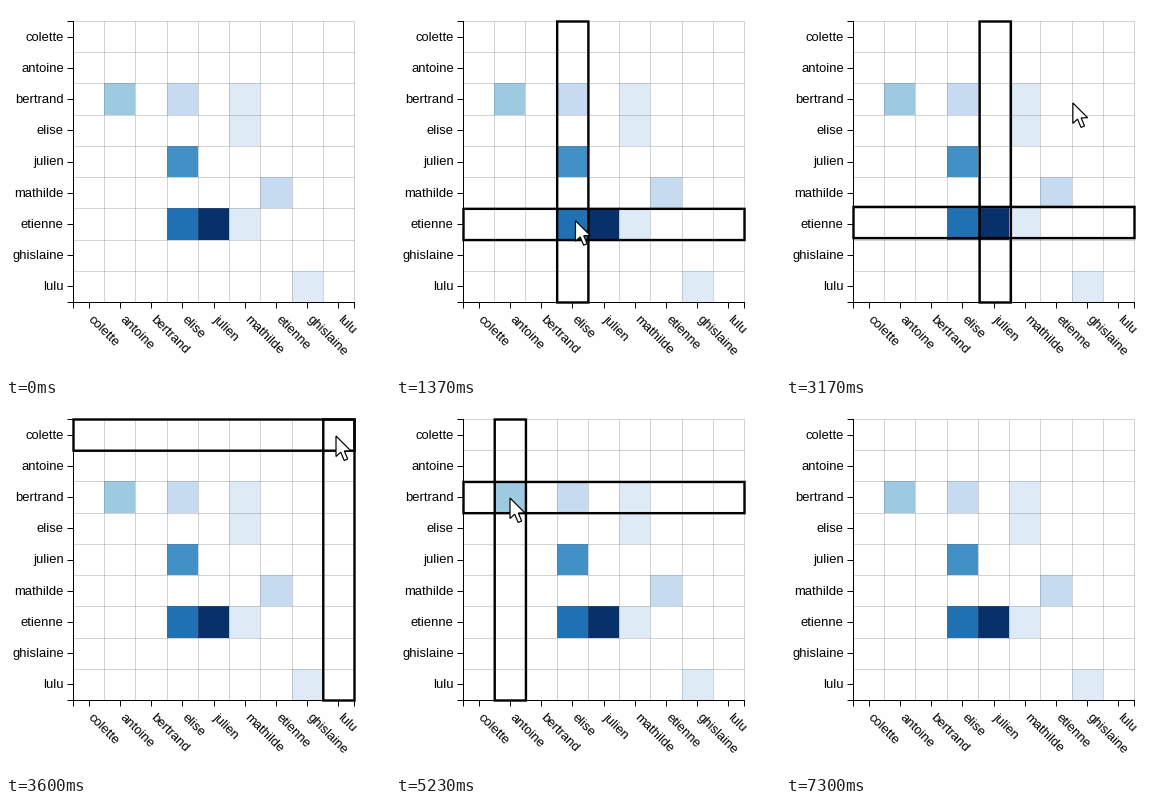
Write a matplotlib script that moves like this. It is 384x370 px and loops after 7.33 s.

```python
import matplotlib.pyplot as plt
from matplotlib.animation import FuncAnimation
from matplotlib.patches import Polygon, Rectangle

W, H = 384, 370
FRAMES, LOOP = 220, 7330
SUBSTEPS = 8  # hover checks per frame
PX = 0.72  # points per pixel at 100 dpi
LEFT, TOP, SIZE = 67, 15, 281
NAMES = ["colette", "antoine", "bertrand", "elise", "julien",
         "mathilde", "etienne", "ghislaine", "lulu"]
STEP = SIZE / len(NAMES)
RIGHT, BOTTOM = LEFT + SIZE, TOP + SIZE

# (column, row): number of links
LINKS = {(1, 2): 3, (3, 2): 2, (5, 2): 1, (5, 3): 1, (3, 4): 5,
         (6, 5): 2, (3, 6): 6, (4, 6): 8, (5, 6): 1, (7, 8): 1}

# pointer moves: start in seconds, x, y
ENTRY = (400, 28)
MOVES = [(0.3, 349, 14), (0.647, 192, 207), (1.1, 179, 215), (2.4, 207, 217),
         (2.985, 330, 32), (4.218, 114, 94), (6.1, 46, 94)]
MOVE, GLIDE = 0.3, 0.2
ARROW = [(0, 0), (0, 20.5), (4.7, 16.2), (8.2, 24.5), (11.7, 23),
         (8.3, 15), (14.8, 14.8)]


def progress(t, start, length):
    return min(max((t - start) / length, 0), 1)


def ease(u):
    return 4 * u ** 3 if u < 0.5 else 1 - 4 * (1 - u) ** 3


def mix(a, b, k):
    return tuple(p + (q - p) * k for p, q in zip(a, b))


def pointer_at(t):
    if not MOVES[0][0] <= t < MOVES[-1][0] + MOVE:
        return None
    tip = ENTRY
    for start, *stop in MOVES:
        u = progress(t, start, MOVE)
        tip = mix(tip, stop, u * u * (3 - 2 * u))
    return tip


def cell_at(tip):
    if tip is None:
        return None
    x, y = tip
    if LEFT <= x < RIGHT and TOP <= y < BOTTOM:
        return int((x - LEFT) / STEP), int((y - TOP) / STEP)


def track_hover():
    """Bands glide to the hovered cell; each new cell restarts the glide."""
    states = []
    cell, origin, spot, start = None, (0, 0), (0, 0), 0
    for n in range(FRAMES * SUBSTEPS):
        t = n * LOOP / 1000 / FRAMES / SUBSTEPS
        hovered = cell_at(pointer_at(t))
        if hovered != cell:
            cell, origin, start = hovered, spot, t
        if cell:
            spot = mix(origin, cell, ease(progress(t, start, GLIDE)))
        if n % SUBSTEPS == 0:
            states.append(spot if cell else None)
    return states


plt.rcParams["font.family"] = "Liberation Sans"
fig = plt.figure(figsize=(W / 100, H / 100), dpi=100, facecolor="#fefefe")
ax = fig.add_axes([0, 0, 1, 1])
ax.set_xlim(0, W)
ax.set_ylim(H, 0)
ax.axis("off")


def line(xs, ys, color="black", z=3):
    ax.plot(xs, ys, color=color, lw=PX, solid_capstyle="butt", zorder=z)


def band(w, h):
    return ax.add_patch(Rectangle((LEFT + 0.5, TOP + 0.5), w, h, fill=False,
                                  ec="black", lw=2.4 * PX, joinstyle="miter",
                                  snap=False, zorder=5))


for (c, r), n in LINKS.items():
    ax.add_patch(Rectangle((LEFT + c * STEP, TOP + r * STEP), STEP, STEP,
                           fc=plt.cm.Blues(n / 8), lw=0, zorder=1))

for i in range(len(NAMES) + 1):
    x, y = LEFT + i * STEP, TOP + i * STEP
    line([x, x], [TOP, BOTTOM], (0.4, 0.4, 0.4, 0.28), z=2)
    line([LEFT, RIGHT], [y, y], (0.4, 0.4, 0.4, 0.28), z=2)

line([LEFT - 6, LEFT, LEFT, LEFT - 6], [TOP, TOP, BOTTOM, BOTTOM])
line([LEFT, LEFT, RIGHT, RIGHT], [BOTTOM + 6, BOTTOM, BOTTOM, BOTTOM + 6])
for i, name in enumerate(NAMES):
    mid = (i + 0.5) * STEP
    x, y = LEFT + mid, TOP + mid
    line([LEFT - 6, LEFT], [y, y])
    line([x, x], [BOTTOM, BOTTOM + 6])
    ax.text(LEFT - 9.2, y + 4, name, size=13 * PX, ha="right", va="baseline")
    ax.text(x - 0.8, BOTTOM + 17.5, name, size=13 * PX, rotation=-45,
            rotation_mode="anchor", ha="left", va="baseline")

column, row = band(STEP, SIZE), band(SIZE, STEP)
pointer = ax.add_patch(Polygon(ARROW, closed=True, fc="white", ec="black",
                               lw=1.2 * PX, zorder=6))
hover = track_hover()


def update(i):
    spot, tip = hover[i], pointer_at(i * LOOP / 1000 / FRAMES)
    column.set_visible(spot is not None)
    row.set_visible(spot is not None)
    pointer.set_visible(tip is not None)
    if spot:
        column.set_x(LEFT + 0.5 + spot[0] * STEP)
        row.set_y(TOP + 0.5 + spot[1] * STEP)
    if tip:
        pointer.set_xy([(tip[0] + x, tip[1] + y) for x, y in ARROW])
    return column, row, pointer


anim = FuncAnimation(fig, update, frames=FRAMES, interval=LOOP / FRAMES,
                     repeat=True, repeat_delay=0)
plt.show()
```
